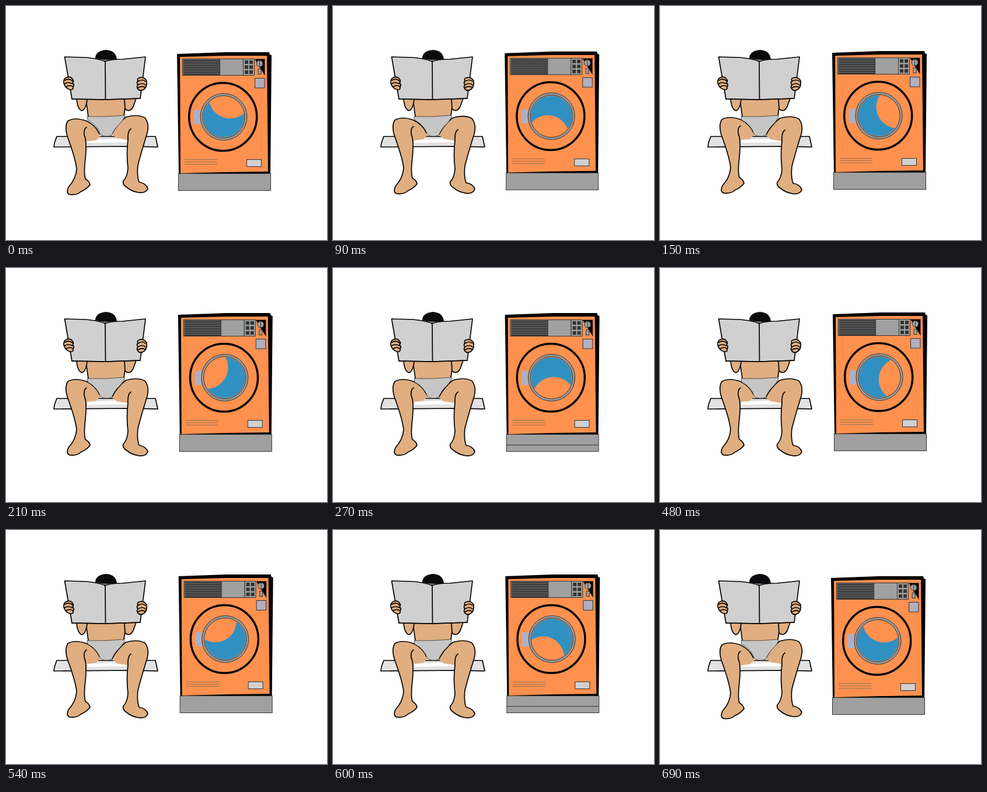
An HTML page for the animation above (720 ms loop, 550x400 px).

```html
<!DOCTYPE html>
<html lang="en">
<head>
<meta charset="utf-8">
<title>Laundry day</title>
<style>
  html, body { margin: 0; width: 100%; height: 100%; overflow: hidden; background: #fff; }
  svg { display: block; width: 550px; height: 400px; }
  .ink { stroke: #000; stroke-width: 1.7; stroke-linejoin: round; stroke-linecap: round; }
  .skin { fill: #e0ae80; }
  .line { fill: none; }
  .page { fill: #d0d0d0; }
  .thin { stroke: #333; stroke-width: 1; }
  .grey { fill: #a0a0a0; }
  .lilac { fill: #b0aec0; }
</style>
</head>
<body>
<svg viewBox="0 0 550 400">
  <g id="bench">
    <path class="ink" fill="#e2e2e2" d="M87 223L256 223L260 241L210 240L82 241L83 234Z"/>
    <path fill="#fff" d="M140 229L205 226L207 233L140 234Z"/>
  </g>

  <g id="body">
    <path class="skin" d="M137 158L141 192L203 190L206 158Z"/>
    <path class="ink line" d="M137 160L141 189M206 160L202 187"/>
    <path class="skin ink" d="M121 158Q122 176 130 179Q137 177 139 160M203 160L204 176Q212 183 218 172L223 158"/>
  </g>

  <g id="leftLeg">
    <path class="skin" d="M162 220Q155 203 138 194Q118 187 106 194Q100 203 105 220Q119 258 121 276Q120 293 107 307Q102 318 110 320Q122 321 128 315Q139 310 144 303Q143 297 136 293Q133 283 136 258L137 229L154 227Z"/>
    <path class="ink line" d="M160 216Q154 202 138 194Q118 187 106 194Q100 203 105 220Q119 258 121 276Q120 293 107 307Q102 318 110 320Q122 321 128 315Q139 310 144 303Q143 297 136 293Q133 283 136 258Q139 228 134 218Q133 207 138 205"/>
  </g>
  <g id="rightLeg">
    <path class="skin" d="M181 221Q189 205 205 192Q225 186 238 193Q246 203 242 219Q232 251 226 274Q224 292 228 303Q240 305 243 314Q240 322 228 321Q215 319 207 312Q199 307 201 301Q208 294 209 279Q206 255 209 231L190 228Z"/>
    <path class="ink line" d="M182 220Q189 205 205 192Q225 186 238 193Q246 203 242 219Q232 251 226 274Q224 292 228 303Q240 305 243 314Q240 322 228 321Q215 319 207 312Q199 307 201 301Q208 294 209 279Q206 255 209 231Q208 216 214 212"/>
  </g>
  <path fill="#c6c6c6" stroke="#333" stroke-width=".8" d="M139 189Q171 190 203 187Q204 191 196 200Q186 209 181 221Q171 225 162 220Q156 203 140 195Z"/>

  <g id="reader">
    <path fill="#0b0b0d" d="M153 91Q152 77 171 75Q189 76 190 92L171 95Z"/>
    <path stroke="#fff" class="line" d="M155 90Q166 94 181 92"/>
    <path class="page ink" d="M100.500 87L137 88Q163 91 170 95Q178 91 200 91L239 87L230 158L171 160L113 159Z"/>
    <path class="ink line" stroke-width="2" d="M170 95L170.500 160M113 159L171 160L230 158"/>
    <path class="skin ink" stroke-width="1.300" d="M104 122Q111 120 114 125Q117 128 114 131Q118 135 115 138Q116 144 110 143Q102 141 99 132Q98 124 104 122Z"/>
    <path class="ink line" d="M101 127Q108 123 114 128M100 133Q107 129 114 133M103 138Q109 134 115 138"/>
    <path class="skin ink" d="M228 123Q236 120 241 128Q242 138 237 142Q230 147 226 142Q223 138 226 135Q223 131 226 128Q224 124 228 123Z"/>
    <path class="ink line" stroke-width="1" d="M226 129Q234 124 239 129M226 135Q234 130 239 135M226 140Q233 136 238 139"/>
  </g>

  <g id="machine">
    <path d="M293 82L375 79L451 79L452 83L455 84L453 288L296 288Z"/>
    <path fill="#ff914f" d="M298 87L375 85L447 85L449 283L375 284L299 286Z"/>
    <rect class="grey thin" x="295.5" y="286.5" width="158" height="29"/>
    <path id="seam" class="thin" d="M295.500 304.500H453.500"/>

    <rect class="thin" fill="#777" x="302.5" y="90.5" width="64" height="28"/>
    <g id="vents"></g>
    <rect class="grey thin" x="366.5" y="90.5" width="40" height="28"/>
    <rect class="grey thin" x="406.5" y="90.5" width="19" height="28"/>
    <g id="buttons"></g>
    <path stroke="#8a5a3c" d="M426 90.500H443.500V119"/>
    <circle class="grey thin" cx="434.500" cy="98.500" r="5.500"/>
    <path class="thin" d="M434.500 93V104"/>
    <rect class="grey thin" x="432" y="107.500" width="5" height="9"/>
    <rect class="lilac thin" x="426.500" y="123.500" width="16.500" height="16.500"/>
    <path stroke="#96714f" d="M306 262.500H362M306 266.500H362M306 270.500H362"/>
    <rect class="thin" fill="#d0d0d0" x="412.500" y="262.500" width="25" height="12"/>

    <circle class="line" cx="371.700" cy="189.500" r="58" stroke="#000" stroke-width="3.500"/>
    <rect class="lilac" x="321.500" y="178" width="12.500" height="24"/>
    <circle class="thin" cx="373" cy="189.500" r="40" fill="#9a9a9a"/>
    <circle class="thin" cx="373" cy="189.500" r="36.200" fill="#ff914f"/>
    <path id="water" fill="#3090c2"/>
  </g>
</svg>
<script>
const $ = id => document.getElementById(id);
const STEP = 30, STEPS = 24, LAST = STEPS - 1;
// step, shake to the right, shake upwards
const SHAKE = [[0, 0, 0], [5, 2, 2], [9, 1.6, 2], [12, 3, 3], [16, 3, 3], [20, 2.3, 3], [23, 0, 0]];

const rects = (count, attrs) => Array.from({ length: count }, (_, i) => `<rect ${attrs(i)} fill="#333"/>`).join('');
$('vents').innerHTML = rects(9, i => `x="304" y="${92 + i * 3}" width="62" height="2"`);
$('buttons').innerHTML = rects(6, i => `x="${409 + i % 2 * 8}" y="${93 + (i >> 1) * 8.5}" width="6" height="6"`);

// Disc with a round bite taken out of its right side
const R = 35, BITE = 36.5, x = 16.2, y = Math.sqrt(R * R - x * x);
$('water').setAttribute('d', `M${x} ${-y}A${R} ${R} 0 1 0 ${x} ${y}A${BITE} ${BITE} 0 0 1 ${x} ${-y}Z`);

function shakeAt(n) {
  const i = Math.max(1, SHAKE.findIndex(k => k[0] >= n));
  const a = SHAKE[i - 1], b = SHAKE[i], p = (n - a[0]) / (b[0] - a[0]);
  return [1, 2].map(j => a[j] + (b[j] - a[j]) * p);
}

const move = (id, dx, dy) => $(id).setAttribute('transform', `translate(${dx} ${dy})`);

function draw(now) {
  const n = Math.floor(now / STEP) % STEPS;
  const [dx, up] = shakeAt(n);
  const rest = 1 - Math.min(1, up / 2);
  move('machine', dx, -up);
  move('leftLeg', 0, 2.5 * rest);
  move('rightLeg', 0, -2 * rest);
  $('seam').style.display = n % 11 === 9 ? '' : 'none';
  $('water').setAttribute('transform', `translate(373 189.5) rotate(${-72 - 1440 * n / LAST})`);
}

const start = performance.now();
function tick() {
  draw(performance.now() - start);
  requestAnimationFrame(tick);
}
tick();
</script>
</body>
</html>
```
